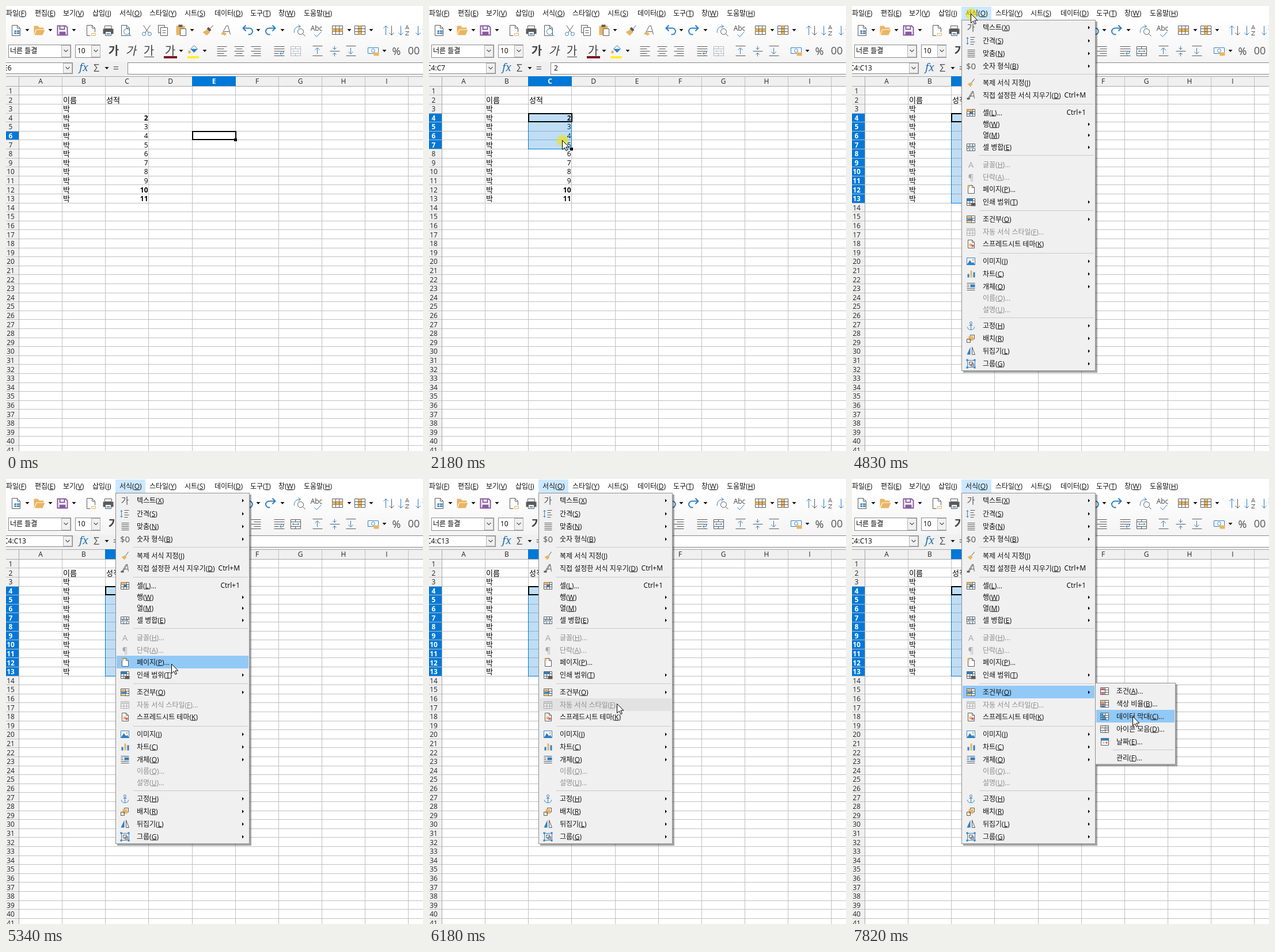
Animation, 724 px wide and 773 px high, one loop 8 s. Source, as an HTML page:

```html
<!DOCTYPE html>
<html lang="ko">
<head>
<meta charset="utf-8">
<title>스프레드시트 조건부 서식</title>
<style>
html, body { margin: 0; width: 100%; height: 100%; overflow: hidden; background: #fff; }
svg { display: block; width: 724px; height: 773px; }
text { font: 12px "Open Sans", "Noto Sans CJK KR", "Noto Sans CJK", sans-serif; white-space: pre; }
.bold { font-weight: 700; }
.cell { font-size: 13px; }
rect { shape-rendering: crispEdges; }
</style>
</head>
<body>
<svg id="stage" viewBox="0 0 724 773" xmlns="http://www.w3.org/2000/svg"></svg>
<script>
const BLUE = '#0078d7', HOT = '#91c9f7';
const LOOP = 8000;

// ---------- markup helpers ----------
const rect = (x, y, w, h, fill, extra = '') =>
  `<rect x="${x}" y="${y}" width="${w}" height="${h}" fill="${fill}" ${extra}/>`;
const frame = (x, y, w, h, fill, line) =>
  rect(x, y, w, h, line) + rect(x + 1, y + 1, w - 2, h - 2, fill);
const text = (x, y, s, extra = '') => `<text x="${x}" y="${y}" ${extra}>${s}</text>`;
const mid = 'text-anchor="middle"', end = 'text-anchor="end"';
const label = (x, y, s, fill = '#111') =>
  text(x, y, s.replace(/\((\w)\)/, '(<tspan text-decoration="underline">$1</tspan>)'), `fill="${fill}"`);
const group = (id, body, extra = '') => `<g id="${id}" ${extra}>${body}</g>`;
const drop = (x, y) => `<path d="M${x - 3.5} ${y - 2}h7l-3.5 4z" fill="#111"/>`;
const chevron = (x, y) => `<path d="M${x - 3.5} ${y - 2}l3.5 3.5 3.5-3.5" fill="none" stroke="#555" stroke-width="1.2"/>`;

// Icon pieces are split by ";": a colour key, then a path.
// Upper case fills, lower case strokes, T writes a text.
const paint = { k: '#5a5a5a', b: '#2f7fc2', o: '#e9b560', g: '#b4b4b4', p: '#8a5aa0', w: '#fff', t: '#2c9aa0', r: '#d4606e' };
function piece(s) {
  const key = s[0], d = s.slice(1).trim();
  if (key === 'T') return text(0, 5, d, `${mid} fill="#555" style="font-size:15px"`);
  const c = paint[key.toLowerCase()];
  return key < 'a' ? `<path d="${d}" fill="${c}"/>` : `<path d="${d}" fill="none" stroke="${c}"/>`;
}
const icon = (x, y, s, extra = '') =>
  `<g transform="translate(${x + .5} ${y + .5})" ${extra}>${s.split(';').map(piece).join('')}</g>`;

const doc = 'WM-7-9h9l5 5v13h-14z;kM-7-9h9l5 5v13h-14zM2-9v5h5';
const page = 'WM-5-7h7l4 4v10h-11z;kM-5-7h7l4 4v10h-11zM2-7v4h4';
const grid = 'WM-7-6h14v12h-14z;kM-7-6h14v12h-14zM-7-2h14M-7 2h14M-2-6v12M3-6v12';
const table = 'WM-9-8h18v15h-18z;kM-9-8h18v15h-18zM-9-3h18M-9 2h18M-3-8v15M3-8v15';
const lens = 'kM7 2a5 5 0 1 0-10 0a5 5 0 1 0 10 0M6 6l4 4';
const lines = widths => 'k' + widths.map(([x, w], i) => `M${x} ${i * 4 - 8}h${w}`).join('');
const condition = 'WM-7-6h14v12h-14z;kM-7-6h14v12h-14zM-7-2h14M-7 2h14M1-6v12';

// ---------- window chrome ----------
const bar = [[0, '파일(F)'], [50, '편집(E)'], [99, '보기(V)'], [150, '삽입(I)'], [197, '서식(O)'], [249, '스타일(Y)'],
  [310, '시트(S)'], [362, '데이터(D)'], [424, '도구(T)'], [473, '창(W)'], [517, '도움말(H)'], [580, '']];

const thick = 'stroke-width="2"';
const tools = [
  [17, doc + ';BM-3 0h9v6h-9z;wM-3 3h9M1 0v6'],
  [57, 'OM-9-8h7l2 3h8v3h-13l-4 10z;OM-5-1h15l-4 9h-14z;wM-5-1l-3 8'],
  [97, 'WM-8-8h14l3 3v13h-17z;pM-8-8h14l3 3v13h-17zM-4-8v6h8v-6;PM-5 2h11v6h-11z', thick],
  [147, doc + ';WM-1 3h10v7h-10z;oM1 5h7v4h-7z'],
  [177, 'KM-9-3h18v9h-18z;WM-6-8h12v5h-12zM-5 2h10v7h-10z;kM-6-8h12v5h-12zM-5 2h10v7h-10z;BM-3 5h6v2h-6z'],
  [207, doc + ';' + lens.replace('k', 'b')],
  [244, 'kM-6-9l9 13M6-9l-9 13;bM-2 6a3 3 0 1 0-6 0a3 3 0 1 0 6 0M8 6a3 3 0 1 0-6 0a3 3 0 1 0 6 0'],
  [272, 'WM-8-9h11v13h-11z;kM-8-9h11v13h-11z;WM-4-5h12v14h-12z;kM-4-5h12v14h-12zM-1 0h6M-1 4h6'],
  [303, 'OM-8-8h15v16h-15z;KM-4-10h7v4h-7z;WM-1-3h10v12h-10z;kM-1-3h10v12h-10z'],
  [350, 'kM2-1l7-8;OM-9 3l8-5 5 5-6 6z;KM-2-3l3-3 5 5-3 3z'],
  [382, 'kM-8 7l8-15h3l4 15M-4 2h9;OM-9 5l4-3 6 4-4 3z'],
  [419, 'bM-7-4h10a5 5 0 0 1 0 11h-2M-3-9l-5 5 5 5', thick],
  [459, 'bM7-4h-10a5 5 0 0 0 0 11h2M3-9l5 5-5 5', thick],
  [509, lens + ';bM-9 4a9 9 0 0 1 10-11M-2-10l4 3-4 3'],
  [538, 'bM-3 7l4 4 8-9'],
  [575, table + ';OM-9-3h18v5h-18z;kM-3-3v5M3-3v5'],
  [614, table + ';OM-3-8h6v15h-6z;kM-3-3h6M-3 2h6'],
  [664, 'bM-5 8v-16M-9-4l4-4 4 4;kM5-8v16M1 4l4 4 4-4'],
  [692, 'bM-7-8v16M-11 4l4 4 4-4;kM1-2l3-7 3 7M2-4h4M1 2h6l-6 6h6'],
  [722, 'bM-7-8v16M-11 4l4 4 4-4;kM1-8h6l-6 6h6']
];
const left = [[-8, 17], [-8, 12], [-8, 17], [-8, 12], [-8, 17]];
const centre = [[-8, 17], [-5, 11], [-8, 17], [-5, 11], [-8, 17]];
const right = [[-8, 17], [-3, 12], [-8, 17], [-3, 12], [-8, 17]];
const format = [
  [374, lines(left)], [404, lines(centre)], [433, lines(right)],
  [474, lines([[-9, 18], [-9, 18], [-9, 18], [-9, 8], [-9, 18]]) + ';bM1 4h6v-4M4 1l-3 3 3 3'],
  [540, 'kM-8-9h17M-8 8h17;bM0 5v-10M-4-2l4-4 4 4'],
  [570, 'kM-8 0h17;bM0-9v6M-3-6l3 3 3-3M0 9v-6M-3 6l3-3 3 3'],
  [598, 'kM-8-9h17M-8 8h17;bM0-6v10M-4 1l4 4 4-4'],
  [637, 'WM-9-6h18v10h-18z;bM-9-6h18v10h-18zM3-1a3 3 0 1 0-6 0a3 3 0 1 0 6 0;OM1 2h9v6h-9z']
];
const merge = 'WM-8-8h17v16h-17z;kM-8-8h17v16h-17zM-8-4h17M-8 4h17M0-8v4M0 4v4;bM-5 0h11M-3-2l-2 2 2 2M4-2l2 2-2 2';

function chrome() {
  const ga = (x, extra) => text(x, 85, '가', `${mid} fill="#444" ${extra}`);
  const big = 'style="font-size:20px"';
  return rect(0, 0, 724, 122, 'url(#fade)') + rect(0, 97, 724, 25, '#f0f0f0') +
    rect(0, 1, 50, 23, '#e5f3ff', 'id="hover"') +
    bar.map(([x, s]) => label(x, 17, s)).join('') +
    tools.map(([x, s, extra]) => icon(x, 42, s, extra)).join('') +
    text(539, 43, 'Abc', `${mid} fill="#444"`) +
    [37, 77, 118, 323, 438, 480, 596, 634].map(x => drop(x, 42)).join('') +
    frame(4, 67, 109, 23, '#fff', '#8a8a8a') + frame(96, 68, 16, 21, '#f0f0f0', '#b5b5b5') + chevron(104, 78) +
    text(7, 82, '너른 들결') +
    frame(120, 67, 44, 23, '#fff', '#8a8a8a') + frame(148, 68, 16, 21, '#f0f0f0', '#b5b5b5') + chevron(156, 78) +
    text(124, 82, '10') +
    ga(187, 'style="font-size:20px;font-weight:700"') +
    `<g transform="translate(18 0) skewX(-12)">${ga(217, big)}</g>` +
    ga(248, big) + rect(240, 88, 17, 1, '#444') +
    ga(285, big) + rect(274, 87, 23, 4, '#7e1420') +
    icon(325, 76, 'bM-5-2l6-6 6 6-6 6z;BM-5-2h12l-6 6z;OM-9 1h4v5h-4z') + rect(315, 87, 20, 4, '#ffef2a') +
    [304, 345, 657].map(x => drop(x, 78)).join('') +
    format.map(([x, s]) => icon(x, 78, s)).join('') +
    icon(502, 78, merge, 'id="merge"') +
    text(678, 85, '%', `${mid} fill="#444" style="font-size:18px"`) +
    text(708, 84, '00', `${mid} fill="#555" style="font-size:18px"`) +
    frame(-2, 98, 118, 20, '#fff', '#8a8a8a') + frame(99, 99, 16, 18, '#f0f0f0', '#b5b5b5') + chevron(107, 108) +
    text(135, 113, 'fx', `${mid} fill="#1f6dae" style="font:italic 18px 'Noto Serif',serif"`) +
    text(157, 114, 'Σ', `${mid} fill="#555" style="font-size:18px"`) + drop(175, 108) +
    text(191, 114, '=', `${mid} fill="#555" style="font-size:18px"`) +
    frame(211, 98, 520, 21, '#fff', '#8a8a8a');
}

// ---------- sheet ----------
const PITCH = 15.6, TOP = 138.8;
const colX = n => Math.round(22 + 75.15 * n);
const rowY = n => Math.round(TOP + PITCH * n);
const baseline = n => Math.round(TOP + PITCH * n - 2.4);
const colName = (n, extra = '') => text((colX(n) + colX(n + 1)) / 2 + .5, 135, 'ABCDEFGHI'[n] || '', `${mid} ${extra}`);
const rowName = (n, extra = '') => text(8, baseline(n), n, `${mid} ${extra}`);

function sheet() {
  let s = rect(0, 122, 724, 651, '#fff') + rect(0, 122, 724, 17, '#f0f0f0') + rect(0, 122, 22, 651, '#f0f0f0');
  for (let c = 0; c < 10; c++) s += rect(colX(c), 122, 1, 651, '#c0c0c0') + colName(c, 'fill="#222"');
  for (let r = 0; r <= 41; r++) s += rect(0, rowY(r), 724, 1, '#c0c0c0') + (r ? rowName(r, 'fill="#222"') : '');
  s += rect(0, 122, 724, 1, '#a8a8a8') + rect(0, rowY(0), 724, 1, '#a8a8a8') + rect(22, 122, 1, 651, '#a8a8a8');
  const korean = (x, r, word) => text(x, baseline(r) - .5, word, 'class="cell"');
  s += korean(99, 2, '이름') + korean(174, 2, '성적');
  for (let r = 3; r <= 13; r++) {
    s += korean(99, r, '박');
    const strong = r === 4 || r > 11 ? 'class="bold"' : '';
    if (r > 3) s += text(246.5, baseline(r), r - 2, `${end} ${strong}`);
  }
  return s;
}

function selection(col, top, bottom) {
  const x = colX(col), w = colX(col + 1) - x, y = rowY(top - 1), h = rowY(bottom) - y;
  const white = 'class="bold" fill="#fff"', letter = 'ABCDE'[col];
  let s = rect(x, 122, w + 1, 17, BLUE) + colName(col, white);
  for (let r = top; r <= bottom; r++) {
    s += rect(0, rowY(r - 1) + 1, 22, rowY(r) - rowY(r - 1) - 1, BLUE) + rowName(r, white);
  }
  if (bottom > top) s += rect(x + .5, y + .5, w, h, BLUE, `fill-opacity=".25" stroke="${BLUE}"`);
  s += rect(x + 1, y + 1, w, rowY(top) - y - 1, 'none', 'stroke="#000" stroke-width="2"');
  s += rect(x + w - 2, y + h - 2, 5, 5, '#000');
  const first = letter + top;
  return s + text(-4, 112, bottom > top ? `${first}:${letter}${bottom}` : first) + (col === 2 ? text(217, 112, '2') : '');
}

// ---------- menus: centre y, label, icon, option (">" opens, "-" disabled, else shortcut) ----------
const mainMenu = [
  [37, '텍스트(X)', 'T가', '>'],
  [60, '간격(S)', 'bM-6-6v12M-8-4l2-2 2 2M-8 4l2 2 2-2;kM-1-6h8M-1-2h6M-1 2h8M-1 6h6', '>'],
  [82, '맞춤(N)', 'kM-6-6h13M-6-3h13M-6 0h13M-6 3h13M-6 6h13', '>'],
  [104, '숫자 형식(B)', 'T$0', '>'],
  [133, '복제 서식 지정(J)', 'kM1 0l5-7;OM-6 2l6-3 3 3-4 5z', ''],
  [155, '직접 설정한 서식 지우기(D)', 'kM-5 5l7-12h2l2 12M-2 1h7M-3 5l7-12;KM-7 4h5v3h-5z', 'Ctrl+M'],
  [185, '셀(L)...', grid + ';OM-7-6h9v4h-9z;BM-2-2h5v4h-5z', 'Ctrl+1'],
  [205, '행(W)', '', '>'],
  [224, '열(M)', '', '>'],
  [245, '셀 병합(E)', grid + ';WM-6-1h13v3h-13z;bM-5 0h10M-3-2l-2 2 2 2M3-2l2 2-2 2', '>'],
  [275, '글꼴(H)...', 'TA', '-'],
  [297, '단락(A)...', 'T¶', '-'],
  [318, '페이지(P)...', page + ';OM-6-7h4v4h-4z', ''],
  [340, '인쇄 범위(T)', grid + ';BM-7-6h10v4h-10z;KM0 2h8v5h-8z', '>'],
  [370, '조건부(O)', condition + ';OM-6-5h6v3h-6zM-6 3h6v3h-6z;BM-6-1h9v3h-9z', '>'],
  [392, '자동 서식 스타일(F)...', grid + ';GM-7-6h14v4h-14z', '-'],
  [413, '스프레드시트 테마(K)', page + ';OM-3-1h5v5h-5z;RM1 1h4v4h-4z', ''],
  [443, '이미지(I)', 'WM-7-6h14v12h-14z;bM-7-6h14v12h-14z;BM-7 6l5-8 4 5 2-2 3 5z;OM2-4h3v3h-3z', '>'],
  [465, '차트(C)', 'BM-6 0h3v6h-3zM4-3h3v9h-3z;OM-1-6h3v12h-3z', '>'],
  [487, '개체(O)', 'kM-7-6h14M-7-3h4M-7 0h4M-7 3h14M-7 6h14;BM-1-4h8v5h-8z', '>'],
  [507, '이름(Q)...', '', '-'],
  [527, '설명(U)...', '', '-'],
  [555, '고정(H)', 'bM0-3v10M-3-1h6M-6 2c0 4 4 5 6 5s6-1 6-5M2-5a2 2 0 1 0-4 0a2 2 0 1 0 4 0', '>'],
  [577, '배치(R)', 'kM-1-6h7v7h-7z;OM-4-4h8v8h-8z;kM-7 1h6v6h-6z', '>'],
  [599, '뒤집기(L)', 'BM-1-7v13h-6z;kM2-7v13h5z', '>'],
  [621, '그룹(G)', 'bM-6-6h13v12h-13z;kM-3-3h6v5h-6zM0 0h5v4h-5z;BM-8-8h3v3h-3zM5-8h3v3h-3zM-8 5h3v3h-3zM5 5h3v3h-3z', '>']
];
const subMenu = [
  [368, '조건(A)...', condition + ';RM-6-5h6v3h-6zM-6 3h6v3h-6z', ''],
  [390, '색상 비율(B)...', condition + ';OM-6-5h6v3h-6z;RM-6-1h6v3h-6z;BM-6 3h6v3h-6z', ''],
  [412, '데이터 막대(C)...', condition + ';BM-6-5h4v3h-4zM-6-1h7v3h-7zM-6 3h9v3h-9z', ''],
  [434, '아이콘 모음(D)...', condition + ';rM-5-4h3M3 0h3;tM-5 4h3M3-4h3', ''],
  [456, '날짜(E)...', 'WM-6-6h13v12h-13z;kM-6-6h13v12h-13z;BM-6-6h13v4h-13z;OM-3 0h3v3h-3z;RM2 0h3v3h-3z', ''],
  [484, '관리(F)...', '', '']
];

function panel(id, x, y, w, h, rows, gaps) {
  const rowsMarkup = rows.map(([cy, name, art, opt]) => {
    const off = opt === '-';
    let s = art ? icon(x + 16, cy, art, off ? 'opacity=".45"' : '') : '';
    s += label(x + 37, cy + 4.5, name, off ? '#8d8d8d' : '#111');
    if (opt === '>') s += `<path d="M${x + 220} ${cy - 2.5}l3 3-3 3z"/>`;
    else if (opt && !off) s += text(x + 216, cy + 4, opt, end);
    return s;
  }).join('');
  return group(id, rect(x + 3, y + 3, w, h, '#000', 'opacity=".35"') + frame(x, y, w, h, '#f0f0f0', '#8f8f8f') +
    rect(x + 2, 0, w - 4, 22, HOT, `id="${id}Hot"`) +
    gaps.map(g => rect(x + 31, g, w - 34, 1, '#c9c9c9')).join('') + rowsMarkup);
}

const $ = id => document.getElementById(id);
$('stage').innerHTML =
  '<defs><linearGradient id="fade" x2="0" y2="1"><stop offset=".2" stop-color="#fff"/><stop offset="1" stop-color="#f0f0f0"/></linearGradient></defs>' +
  chrome() + sheet() + group('sel', '') +
  panel('main', 190, 24, 233, 610, mainMenu, [118, 170, 259, 355, 429, 541]) +
  panel('sub', 422, 354, 140, 142, subMenu, [470]) +
  group('pointer', '<circle id="press" cx="1" cy="1" r="10" fill="#f2e600" opacity=".6"/>' +
    '<path d="M.5.5v16l4-3.5 2.5 5.5 2.4-1-2.5-5.5h5z" fill="#fff" stroke="#000"/>');

// ---------- motion: start, end, steps, target x, target y ----------
const moves = [
  [230, 1010, 12, 55, 13], [1080, 1440, 6, 265, 160], [1510, 1720, 5, 232, 198],
  [1970, 2700, 12, 228, 333], [2880, 3250, 7, 177, 5], [3570, 3710, 3, 175, 7],
  [4140, 4260, 3, 206, 13], [4910, 5220, 5, 240, 177], [5270, 5340, 2, 287, 321],
  [5400, 5670, 5, 328, 423], [5920, 6180, 5, 326, 390], [6250, 6690, 7, 322, 369],
  [6760, 6880, 3, 483, 370], [7130, 7130, 1, 484, 370], [7630, 7820, 4, 487, 412]
];

function pointerAt(t) {
  let x = 603, y = 755;
  for (const [a, b, n, toX, toY] of moves) {
    if (t < a) break;
    const k = t >= b ? n : Math.floor((t - a) / (b - a) * (n - 1)) + 1;
    const u = k / n, ease = u * u * (3 - 2 * u);
    x += (toX - x) * ease;
    y += (toY - y) * ease;
  }
  return [Math.round(x), Math.round(y)];
}

const show = (id, on) => $(id).setAttribute('visibility', on ? 'visible' : 'hidden');
const set = (id, attrs) => Object.entries(attrs).forEach(([k, v]) => $(id).setAttribute(k, v));

function highlight(id, rows, y, active) {
  const half = row => row[2] || row[0] === 484 ? 11 : 10;
  const row = active && rows.find(r => y >= r[0] - half(r) && y < r[0] + half(r));
  show(id, !!row);
  if (row) set(id, { y: row[0] - half(row), height: half(row) * 2, fill: row[3] === '-' ? '#e2e2e2' : HOT });
}

let selKey = '';
function render(t) {
  const [x, y] = pointerAt(t);
  const open = t >= 4530, subOpen = t >= 6620;

  set('pointer', { transform: `translate(${x} ${y})` });
  show('pointer', t >= 230);
  show('press', (t >= 1970 && t < 2880) || (t >= 4460 && t < 4910));

  const over = open ? 4 : bar.findIndex(([bx], i) => i < 11 && x >= bx - 7 && x < bar[i + 1][0] - 7);
  const hovering = open || (t >= 230 && y < 25 && over >= 0);
  show('hover', hovering);
  if (hovering) {
    const from = bar[over][0] - 7;
    set('hover', { x: from, width: bar[over + 1][0] - 7 - from, fill: open ? '#cce8ff' : '#e5f3ff' });
  }

  const rowUnder = Math.floor((y - TOP) / PITCH) + 1;
  const last = t >= 2700 ? 13 : Math.max(4, Math.min(13, rowUnder));
  const area = t < 1970 ? [4, 6, 6] : [2, 4, last];
  if (selKey !== area.join()) {
    selKey = area.join();
    $('sel').innerHTML = selection(...area);
  }
  set('merge', { opacity: t >= 2880 ? 1 : .4 });

  show('main', open);
  show('sub', subOpen);
  highlight('mainHot', mainMenu, subOpen ? 370 : y, open && y > 25);
  highlight('subHot', subMenu, y, t >= 7630);
}

const start = performance.now();
function tick() {
  render((performance.now() - start) % LOOP);
  requestAnimationFrame(tick);
}
tick();
</script>
</body>
</html>
```
